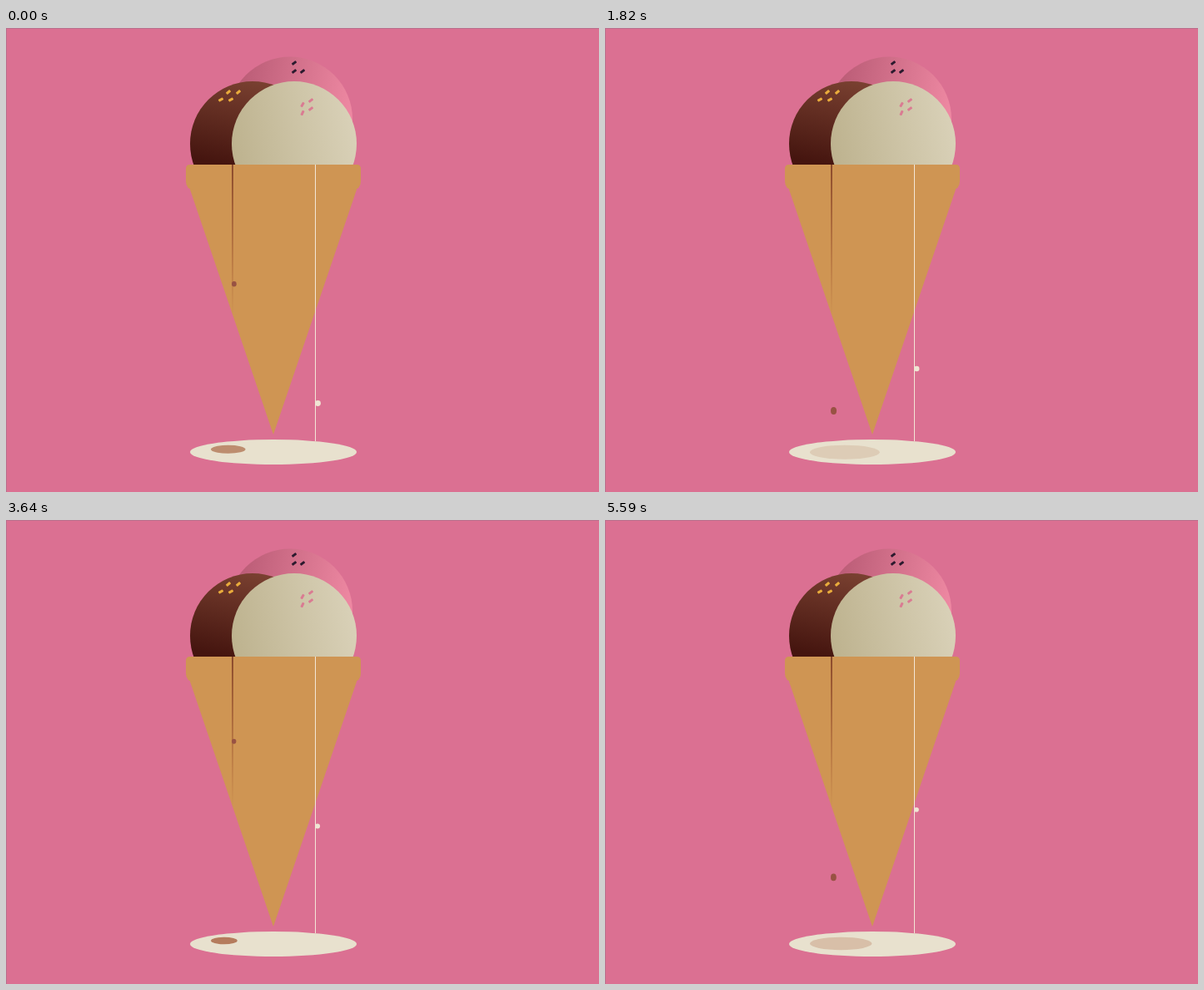
Animation, 712 px wide and 557 px high, one loop 5.72 s. Source, as an HTML page:

```html
<!DOCTYPE html>
<html lang="en">
<head>
<meta charset="utf-8">
<title>Melting ice cream</title>
<style>
  html, body { margin: 0; width: 100%; height: 100%; overflow: hidden; background: #db7092; }
  svg { display: block; width: 712px; height: 557px; }
</style>
</head>
<body>
<svg viewBox="0 0 712 557">
  <defs>
    <linearGradient id="berry" x1="0" y1=".4" x2="1" y2=".6">
      <stop offset="0" stop-color="#b85a74"/><stop offset="1" stop-color="#f08aa4"/>
    </linearGradient>
    <linearGradient id="cocoa" x1=".6" y1="0" x2=".4" y2="1">
      <stop offset="0" stop-color="#7a4131"/><stop offset=".7" stop-color="#45150f"/>
    </linearGradient>
    <linearGradient id="vanilla" x1="0" y1=".6" x2="1" y2=".4">
      <stop offset="0" stop-color="#bdb28e"/><stop offset="1" stop-color="#d9d1b8"/>
    </linearGradient>
    <linearGradient id="trail" gradientUnits="userSpaceOnUse" x1="0" y1="164" x2="0" y2="345">
      <stop offset="0" stop-color="#8b4a2c"/><stop offset="1" stop-color="#a0522d" stop-opacity="0"/>
    </linearGradient>
  </defs>
  <rect width="712" height="557" fill="#db7092"/>
  <path d="M0 .5H712M.5 0V557" stroke="#b9718d"/>

  <circle cx="341" cy="109.5" r="75" fill="url(#berry)"/>
  <circle cx="296" cy="139" r="75" fill="url(#cocoa)"/>
  <circle cx="346" cy="139" r="75" fill="url(#vanilla)"/>
  <g id="sprinkles"></g>

  <path d="M221 190H421V194L321 488L221 194Z" fill="#cf9553"/>
  <path d="M221 164H421Q426 164 426 169V184Q426 194 416 194H226Q216 194 216 184V169Q216 164 221 164Z" fill="#cf9553"/>

  <ellipse cx="321" cy="509" rx="100" ry="15" fill="#e8e1ce"/>
  <ellipse id="stain" fill="#a0522d"/>
  <rect x="271" y="164" width="2" height="181" fill="url(#trail)"/>
  <rect x="371" y="164" width="1" height="332" fill="#f3e6d6"/>
  <ellipse id="cocoaDrop" fill="#985243"/>
  <ellipse id="creamDrop" fill="#efe5d3"/>
</svg>
<script>
  const LOOP = 5720, STEP = 130, CYCLE = 4136, START = 0.414;
  const $ = id => document.getElementById(id);

  // x, y, angle for each sprinkle
  const sprinkles = {
    '#2b1a2e': [[346, 42, -38], [346, 52, -38], [356, 52, -38]],
    '#e9ac3c': [[267, 77, -40], [279, 77, -40], [258, 86, -28], [270, 86, -28]],
    '#da7b92': [[356, 92, -60], [366, 87, -38], [366, 97, -38], [356, 102, -65]]
  };
  $('sprinkles').innerHTML = Object.entries(sprinkles).map(([color, list]) =>
    list.map(([x, y, a]) =>
      `<rect x="-3" y="-1.5" width="6" height="3" rx=".7" fill="${color}" transform="translate(${x} ${y}) rotate(${a})"/>`
    ).join('')).join('');

  function setEllipse(el, left, cy, w, h) {
    el.setAttribute('cx', left + w / 2);
    el.setAttribute('cy', cy);
    el.setAttribute('rx', w / 2);
    el.setAttribute('ry', h / 2);
  }

  const fallY = p => 164 + 346 * p;

  function draw(now) {
    const t = Math.floor(now % LOOP / STEP) * STEP;
    const p = (START + t / CYCLE) % 1;
    const q = 2 * p % 1;
    setEllipse($('cocoaDrop'), 271, fallY(p), 4.5 + 3 * p, 4 + 6 * p);
    setEllipse($('creamDrop'), 371, fallY(q), 4 + 3.5 * q, 3.5 + 4 * q);

    // the stain spreads and fades while the slow drop falls
    const w = 11 + 63 * p + 26 * p * p;
    const h = 3.3 + 0.163 * w;
    setEllipse($('stain'), 246, 500.7 + h / 2, w, h);
    $('stain').setAttribute('opacity', 1 - p);
    requestAnimationFrame(draw);
  }
  draw(0);
</script>
</body>
</html>
```
